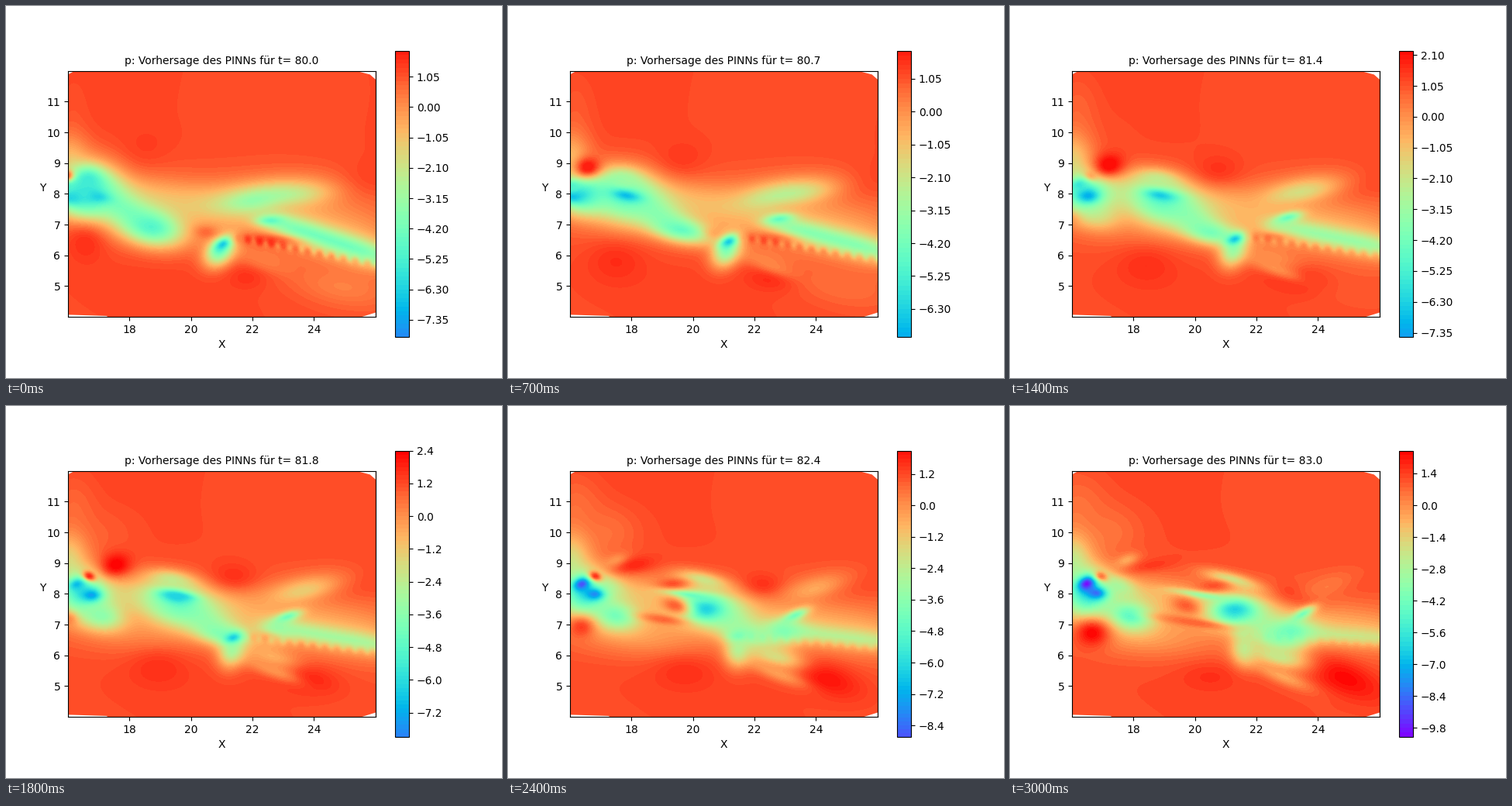
A matplotlib script for the animation above (3.1 s loop, 640 by 480 pixels).

```python
import numpy as np
import matplotlib.pyplot as plt
from matplotlib.animation import FuncAnimation
from matplotlib.patches import Polygon

FRAMES, INTERVAL = 31, 100
VMIN, VMAX = -10.2, 2.4
KEY_TIMES = [0, 0.5, 1, 1.8, 2.2, 2.7, 3]
LOWEST = [-7.95, -7.5, -6.75, -8.1, -8.25, -9.6, -10.2]
HIGHEST = [1.95, 1.8, 2.25, 2.4, 2.1, 2.1, 2.4]

X, Y = np.meshgrid(np.linspace(16, 26, 176), np.linspace(4, 12, 141))


def rise(t, start, end):
    """Smooth step from 0 to 1."""
    u = np.clip((t - start) / (end - start), 0, 1)
    return u * u * (3 - 2 * u)


def paint(z, x, y, length, width, value, angle=0, strength=1, power=2):
    """Blend a tilted soft ellipse of the given pressure into z."""
    c, s = np.cos(np.radians(angle)), np.sin(np.radians(angle))
    u = ((X - x) * c + (Y - y) * s) / length
    v = ((Y - y) * c - (X - x) * s) / width
    z += strength * np.exp(-np.abs(u) ** power - v ** 2) * (value - z)


def background(t):
    z = 1.21 + 0.09 * np.sin(0.55 * (X - 15.5 - 0.5 * t) + 0.25 * (Y - 8))
    return z + 0.04 * np.cos(0.9 * Y - 0.3 * X)


def halos(z, t):
    late = rise(t, 1, 2.8)
    paint(z, 21, 7.4 - 0.05 * t, 6, 1.25, 0.25, -4, power=4)
    paint(z, 19.6, 7.75, 3.2, 0.6, -0.9, -8, power=4)
    paint(z, 18.2, 6.8, 2, 0.75, -0.5, -5, late)
    paint(z, 17.2, 10, 1.1, 0.9, 0.5, 0, late)
    paint(z, 16.2, 10.7, 0.5 + 0.15 * t, 1.2, 1.1 - 0.2 * t)
    paint(z, 16, 9.15, 0.65, 0.85, -0.6 - 0.45 * t)
    paint(z, 24.9, 4.95, 1.6, 0.6, 0.3 + 0.45 * t, -10, 1 - late)
    paint(z, 25.7, 8.5, 1.2, 0.55, 1.45 - 0.1 * t, 10)


def high_pressure(z, t):
    paint(z, 16.6 + 1.3 * t, 5.95 - 0.22 * t + 0.8 * np.exp(-6 * t),
          0.95 - 0.3 * np.exp(-3 * t), 0.8 - 0.12 * t, 1.65 + 0.45 * np.exp(-4 * t))
    paint(z, 18.5 + 1.6 * t, 9.6 - 0.55 * t, 0.8, 0.6 - 0.08 * t,
          1.4 + 0.12 * t, 10 - 8 * t)
    paint(z, 21.8 + t, 5.3, 0.6 + 0.28 * t, 0.4 + 0.06 * t, 1.6 + 0.25 * t, -8 * t)


def streaks(z, t):
    # Upper one fades while it tilts, lower one levels out
    x, y, tilt = 22.5 + 0.6 * t, 7.82 + 0.14 * t, 6 + 4 * t
    paint(z, x, y + 0.1, 2 - 0.3 * t, 0.58 - 0.07 * t, -1.6 + 0.75 * t, tilt)
    paint(z, x, y, 1.4 - 0.27 * t, 0.36 - 0.03 * t, -4.1 + 1.5 * t, tilt)

    x, y, tilt = 24.5 + 0.05 * t, 6.5 + 0.06 * t, -18 + 4.5 * t
    paint(z, x, y + 0.2, 2.3, 0.8 - 0.07 * t, -0.8, tilt, power=4)
    paint(z, x, y, 2.2, 0.38 - 0.04 * t, -4.3 + 0.75 * t, tilt, power=4)


def vortices(z, t):
    paint(z, 17.8 + 1.5 * t, 7.55 - 0.2 * t, 1.15, 0.52, -3.5 + 0.5 * t, -28)
    paint(z, 18.7 + 1.3 * t, 6.93 - 0.13 * t, 1.05 - 0.1 * t,
          0.35 + 0.25 * np.exp(-3 * t), -5 + 0.6 * t, -12)

    x = 16.75 + 1.52 * t
    swing = np.sin(np.pi * t / 3)
    sink = rise(t, 1.6, 2.5)
    paint(z, x, 8.05 - 0.22 * t, 0.95 + 0.2 * swing, 0.92 - 0.14 * t, -4.4, -15 * swing)
    paint(z, x - 0.1, 8.45, 0.45 + 0.15 * t, 0.38 - 0.05 * t,
          -2.2 - 3.4 * np.exp(-2 * t), -5 * t)
    paint(z, x, 7.95 - 0.45 * sink, 0.52, 0.2 + 0.12 * sink,
          -6.3 - 2 * np.exp(-1.5 * t), -10 * (1 - sink))

    # Thin trace left behind above the sinking core
    spread = rise(t, 1.8, 2.8)
    paint(z, 18.6 + 0.55 * t, 7.95, 0.5 + 0.45 * spread, 0.13,
          -6.3 + 2.6 * spread, -9, rise(t, 1.3, 1.8))


def inlet(z, t):
    paint(z, 16.4 + 0.03 * t, 8, 0.85, 0.58 + 0.08 * t, -5.5)
    paint(z, 15.9 + 0.66 * t, 7.3, 0.75, 0.48, -1.8 - t, -10, rise(t, 1, 1.8))
    paint(z, 16.1 + 0.46 * t, 8.25, 0.6, 0.32, -2.9, -18, rise(t, 1.9, 2.7))
    paint(z, 16.1 + 0.7 * rise(t, 0.6, 2), 7.87 + 0.05 * t, 0.34, 0.22, -6.2 - 0.75 * t)
    paint(z, 16 + 0.16 * t, 8.27 + 0.02 * t, 0.25 + 0.02 * t, 0.15 + 0.03 * t,
          -5.2 - 5 * rise(t, 1, 3), 8 * t)


def hot_spots(z, t):
    grow, thin = rise(t, 0, 1), rise(t, 1.9, 2.7)
    paint(z, 15.95 + 0.9 * t, 8.6 + 0.35 * grow, 0.22 + 0.26 * grow + 0.3 * thin,
          0.17 + 0.2 * grow - 0.18 * thin, 1.2 + 1.3 * grow - thin, 10)
    paint(z, 16.3 + 0.22 * t, 8.58, 0.22, 0.14, 1.9 - 1.4 * rise(t, 2.2, 3), -25,
          rise(t, 1.1, 1.8))
    paint(z, 16.4 + 0.46 * t, 9.1, 0.4, 0.2, -0.6, 20, thin)
    grow = rise(t, 1.7, 3)
    paint(z, 16 + 0.65 * grow, 7.15 - 0.43 * grow, 0.28 + 0.3 * grow,
          0.26 + 0.2 * grow, 0.1 + 2.3 * grow, 0, rise(t, 1, 1.8))


def warm_patches(z, t):
    show = rise(t, 1.7, 2.4)
    paint(z, 18.2 + 0.5 * t, 7.62, 0.5, 0.27, 0.9, -18, show)
    paint(z, 15.1 + 1.63 * t, 7.6 - 0.18 * t, 0.6 + 0.6 * rise(t, 2.2, 3), 0.14,
          0.8, -9, show)
    paint(z, 14.3 + 2.1 * t, 8.6 - 0.11 * t, 0.55, 0.17, 1.1, 0, show)
    paint(z, 20.6 + 0.2 * t, 6.7, 0.4, 0.2, 1, -12, 1 - rise(t, 0.3, 1))


def small_vortex(z, t):
    paint(z, 22.4 + 0.1 * t, 5.95, 1, 0.38, 0.4 - 2.6 * rise(t, 1, 2.8), -12)
    paint(z, 22.35 + 0.17 * t, 5.85 - 0.18 * t, 1, 0.26, 0.4 - 0.3 * t, -23)
    paint(z, 20.95 + 0.22 * t, 6.15 + 0.03 * t, 0.57, 0.42, -4.1 + 0.6 * t, 45 + 15 * t)
    paint(z, 21.05 + 0.18 * t, 6.38 + 0.11 * t, 0.32, 0.19,
          -6.8 + 4.5 * rise(t, 1.6, 3), 35 - 12 * t)
    paint(z, 22.3 + 0.27 * t, 6.78, 0.35 + 0.13 * t, 0.24 + 0.06 * t, -2.2 - 0.7 * t,
          0, rise(t, 0.8, 2))
    paint(z, 22.6 + 0.3 * t, 7.13 + 0.07 * t, 0.45, 0.17, -4.8 + 0.2 * t, 10 * t)
    paint(z, 22.45, 6.5 + 0.06 * t, 0.95 - 0.25 * t, 0.18, 1.3 - 0.7 * t, -4,
          1 - rise(t, 1.4, 2.3))


def teeth(z, t):
    edge = 6.52 + 0.04 * t - (0.19 - 0.04 * t) * (X - 21.8)
    window = 1 / (1 + np.exp(-(X - 21.7) / 0.08))
    wave = np.cos(2 * np.pi * (X - 0.1 * t) / 0.39)
    z += (0.65 - 0.17 * t) * wave * window * np.exp(-((Y - edge) / 0.13) ** 2)


LAYERS = [halos, high_pressure, streaks, vortices, inlet, hot_spots,
          warm_patches, small_vortex, teeth]


def field(t):
    z = background(t)
    for layer in LAYERS:
        layer(z, t)
    return z


def levels_at(t):
    low = np.interp(t, KEY_TIMES, LOWEST)
    high = np.interp(t, KEY_TIMES, HIGHEST)
    step = 0.15 if high - low < 12.05 else 0.2
    return np.arange(round(low / step), round(high / step) + 1) * step


CORNERS = [
    [(25.36, 12), (25.82, 11.88), (26, 11.72), (26, 12)],
    [(16, 12), (16.22, 12), (16, 11.88)],
    [(16, 4), (17.3, 4), (17.25, 4.03), (16, 4.07)],
    [(25.55, 4), (26, 4.14), (26, 4)],
]

fig = plt.figure(figsize=(6.4, 4.8), dpi=100)


def draw(i):
    t = i / 10
    fig.clear()
    ax = fig.add_subplot()
    levels = levels_at(t)
    z = np.clip(field(t), levels[0] + 1e-6, levels[-1] - 1e-6)
    filled = ax.contourf(X, Y, z, levels=levels, cmap="rainbow",
                         vmin=VMIN, vmax=VMAX)
    for points in CORNERS:
        ax.add_patch(Polygon(points, color="white", lw=0, zorder=1.5))
    ax.set_aspect("equal")
    ax.set_xlim(16.0005, 25.9995)
    ax.set_ylim(4.0005, 11.9995)
    ax.set_xlabel("X")
    ax.set_ylabel("Y", rotation=0)
    ax.set_title(f"p: Vorhersage des PINNs für t= {80 + t:.1f}", fontsize=10)
    fig.colorbar(filled, ax=ax)
    return []


anim = FuncAnimation(fig, draw, frames=FRAMES, interval=INTERVAL,
                     init_func=lambda: [], repeat=True, repeat_delay=0)
plt.show()
```
